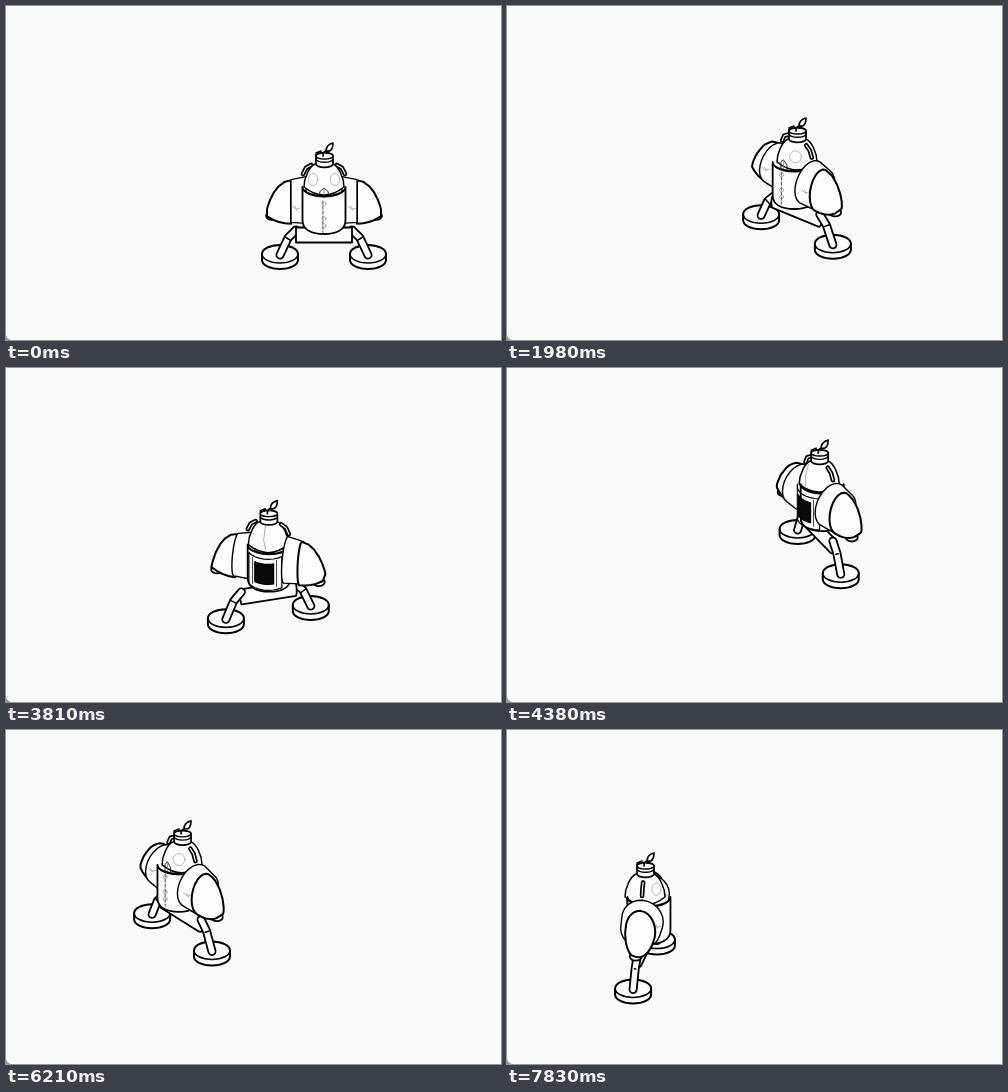
Recreate the animation shown at these times as an HTML page. Size 495 px wide and 334 px high, loop 7.92 s.

```html
<!DOCTYPE html>
<html lang="en">
<head>
<meta charset="utf-8">
<title>Walking robot</title>
<style>
html, body { margin: 0; width: 100%; height: 100%; overflow: hidden; background: #f9f9f9; }
svg { display: block; width: 100vw; height: 100vh; }
</style>
</head>
<body>
<svg viewBox="0 0 495 334" stroke-linejoin="round" stroke-linecap="round">
  <path d="M0 329Q1 333 5 334H0Z" fill="#999"/>
  <g id="robot"></g>
</svg>
<script>
const LOOP = 7920, TICK = 30, START = 180, END = 7830, BEAT = 450;
const TILT = 0.577, FILL = '#fcfcfc', SWING = 31;
const rad = Math.PI / 180;
const robot = document.getElementById('robot');

// one waypoint per beat: ground x, ground y, heading in degrees (0 faces the viewer)
const route = [
  [318, 251, 0], [276, 249, -95], [190, 204, -180], [240, 203, -300],
  [290, 226, -405], [208, 240, -422], [137, 254, -378], [147, 267, -325],
  [258, 249, -196], [290, 201, -200], [361, 165, -310], [394, 184, -413],
  [340, 189, -438], [219, 193, -428], [131, 226, -370], [155, 244, -270],
  [155, 231, -70], [138, 237, 82]
];
// beat, double steps taken so far
const gait = [[0, 0], [2, 1.75], [4, 4.05], [8, 9.1], [17, 18.96]];

// smooth curve through the waypoints
function pose(beat) {
  const last = route.length - 1;
  const i = Math.min(last - 1, Math.floor(beat)), s = beat - i;
  const at = k => route[Math.max(0, Math.min(last, k))];
  return [0, 1, 2].map(c => {
    const [a, b, d, e] = [i - 1, i, i + 1, i + 2].map(k => at(k)[c]);
    return b + s / 2 * (d - a + s * (2 * a - 5 * b + 4 * d - e + s * (3 * (b - d) + e - a)));
  });
}

function steps(beat) {
  const i = Math.max(1, gait.findIndex(key => key[0] >= beat));
  const [a, p] = gait[i - 1], [b, q] = gait[i];
  return p + (q - p) * (beat - a) / (b - a);
}

// u points to the robot's left, v forward, h up
const projector = (x, y, yaw) => {
  const c = Math.cos(yaw), s = Math.sin(yaw);
  return (u, v, h) => [x + u * c + v * s, y + (v * c - u * s) * TILT - h];
};

function hull(points) {
  const sorted = [...points].sort((a, b) => a[0] - b[0] || a[1] - b[1]);
  const half = list => {
    const out = [];
    for (const p of list) {
      while (out.length > 1) {
        const [a, b] = out.slice(-2);
        if ((b[0] - a[0]) * (p[1] - a[1]) - (b[1] - a[1]) * (p[0] - a[0]) > 0) break;
        out.pop();
      }
      out.push(p);
    }
    return out.slice(0, -1);
  };
  return half(sorted).concat(half(sorted.reverse()));
}

const fix = n => n.toFixed(2);
const line = pts => 'M' + pts.map(p => fix(p[0]) + ' ' + fix(p[1])).join('L');
const path = (d, width, fill = 'none', color = '#000') =>
  `<path d="${d}" fill="${fill}" stroke="${color}" stroke-width="${width}"/>`;
const solid = (pts, width) => path(line(hull(pts)) + 'Z', width, FILL);
const oval = (p, rx, ry, width, color = '#000', fill = 'none') =>
  `<ellipse cx="${fix(p[0])}" cy="${fix(p[1])}" rx="${fix(rx)}" ry="${fix(ry)}" fill="${fill}" stroke="${color}" stroke-width="${width}"/>`;
const group = (x, y, body) => `<g transform="translate(${fix(x)} ${fix(y)})">${body}</g>`;
const range = (n, f) => Array.from({ length: n }, (_, i) => f(i));

// elliptic cross-section of a limb at distance u
const ring = (P, u, mid, rv, rh) => range(24, i => {
  const a = i * 15 * rad;
  return P(u, rv * Math.cos(a), mid + rh * Math.sin(a));
});

function leg(P, side) {
  const foot = P(side * 44, 0, 0);
  const bone = line([P(side * 44, 0, 2), P(side * 36, 0, 19), P(side * 28, 0, 27)]);
  return group(foot[0], foot[1],
      path('M-18-3A18 9 0 0 1 18-3V3A18 9 0 0 1-18 3Z', 2, FILL) +
      path('M-18-3A18 9 0 0 0 18-3', 1.6)) +
    path(bone, 9) + path(bone, 5.4, 'none', FILL) +
    path(line([P(side * 39, 0, 20), P(side * 34, 0, 17)]), 1.5);
}

function arm(P, side, yaw, near) {
  const panel = solid([...ring(P, side * 18, 57, 21, 20), ...ring(P, side * 33, 56, 20, 18)], 1.4);
  const sleeve = oval(P(side * 52, -2, 40), 6, 4, 1.8, '#000', FILL) +
    solid(range(7, i => {
      const a = i * 15 * rad, k = Math.cos(a) ** 1.4;
      return ring(P, side * (33 + 24 * Math.sin(a)), 44 + 11 * k, 6 + 9 * k, 20 * k);
    }).flat(), 2);
  let mark = '';
  if (Math.cos(yaw) > 0) {
    const [x, y] = P(side * 28, 16, 59);
    mark = path(`M${fix(x - 4)} ${fix(y - 1)}l4 3 4-1m-5-2l2 4`, 0.7, 'none', '#999');
  }
  return near ? panel + mark + sleeve : sleeve + panel + mark;
}

const shoulder = (P, side) => {
  const d = line([P(side * 21, 0, 83), P(side * 18, 0, 89), P(side * 13, 0, 92)]);
  return path(d, 4.6) + path(d, 1.2, 'none', FILL);
};

// marks on a round surface, visible only while turned to the viewer
function decor(P, yaw) {
  const on = (r, az, h) => P(r * Math.sin(az * rad), r * Math.cos(az * rad), h);
  const front = az => Math.cos(yaw + az * rad);
  const arc = (r, from, to, h) => range(9, i => on(r, from + (to - from) * i / 8, h));
  let head = '', body = '';
  for (const az of [-40, 40]) {
    const f = front(az);
    if (f > 0.15) head += oval(on(17, az, 85), 5.5 * f + 0.5, 6, 0.8, '#aaa');
  }
  if (front(0) > 0.2) {
    head += path(line([on(19, -13, 69), on(19, -13, 76), on(19, 0, 80), on(19, 13, 76), on(19, 13, 69)]), 1, 'none', '#333');
    head += path(line([on(19, 0, 69), on(19, 0, 79)]), 0.7, 'none', '#777');
    const seam = line([on(21, -3, 68), on(21, -3, 36)]);
    body += `<path d="${seam}" fill="none" stroke="#444" stroke-width="1" stroke-dasharray="3 2"/>`;
    for (const h of [66, 51, 44]) body += oval(on(22, 0, h), 2, 2, 0.7, '#999');
  }
  if (front(180) > 0.1) {
    head += path(line([on(14, 180, 96), on(17, 176, 84), on(19, 184, 76)]), 0.7, 'none', '#888');
  }
  if (front(180) > 0.25) {
    const pane = (half, top, low) =>
      line(arc(22, 180 - half, 180 + half, top).concat(arc(22, 180 + half, 180 - half, low))) + 'Z';
    body += path(pane(50, 68, 37), 1.2);
    for (const az of [146, 214]) body += path(line([on(22, az, 66), on(22, az, 40)]), 1, 'none', '#444');
    body += path(pane(26, 63, 43), 1.2, '#0a0a0a');
  }
  return { head, body };
}

const dome = path('M-20-70C-20-80-14-91-9-93H9C14-91 20-80 20-70Q0-54-20-70Z', 1.5, FILL);
const cap = path('M-8-103V-93A8.5 3.3 0 0 0 9-93V-101A8.5 3.3 0 0 0-8-101', 1.7, FILL) +
  path('M-8-104L-3-106V-102M-8-98A8.5 3.3 0 0 0 9-98', 1.4) +
  oval([0.5, -101], 8.5, 3, 1.4, '#000', FILL) +
  path('M-1-101Q-1-105 2-106C2-111 5-113 9-114C9-108 7-105 2-106', 1.7, FILL);
const barrel = path('M-21.5-70A21.5 9 0 0 0 21.5-70V-37C21.5-27 12-23 0-23S-21.5-27-21.5-37Z', 1.8, FILL) +
  path('M-21-67A21.5 9 0 0 0 21-67', 1);

function draw(t) {
  const beat = (t - START) / BEAT;
  const [x, y, turn] = pose(beat);
  const yaw = turn * rad;
  const hip = yaw + SWING * rad * Math.sin(steps(beat) * 2 * Math.PI);
  const body = projector(x, y, yaw), base = projector(x, y, hip);
  const bulge = x + 4 * Math.sin(yaw);
  const each = (angle, near, part) => [-1, 1]
    .filter(side => (-side * Math.sin(angle) > 0.1) === near)
    .map(side => part(side, near)).join('');
  const makeLeg = side => leg(base, side);
  const makeArm = (side, near) => arm(body, side, yaw, near);
  const makeShoulder = side => shoulder(body, side);
  const marks = decor(body, yaw);

  robot.innerHTML =
    each(hip, false, makeLeg) +
    solid([...ring(base, -28, 22, 5, 7), ...ring(base, 28, 22, 5, 7)], 1.8) +
    each(yaw, false, makeArm) +
    each(yaw, false, makeShoulder) +
    group(x, y, dome) + marks.head +
    each(yaw, true, makeShoulder) +
    group(x, y, cap) + group(bulge, y, barrel) + marks.body +
    each(hip, true, makeLeg) +
    each(yaw, true, makeArm);
}

const origin = performance.now();
function frame() {
  const t = (performance.now() - origin) % LOOP;
  const tick = Math.floor(t / TICK) * TICK;
  draw(Math.min(END, Math.max(START, tick)));
  requestAnimationFrame(frame);
}
frame();
</script>
</body>
</html>
```
